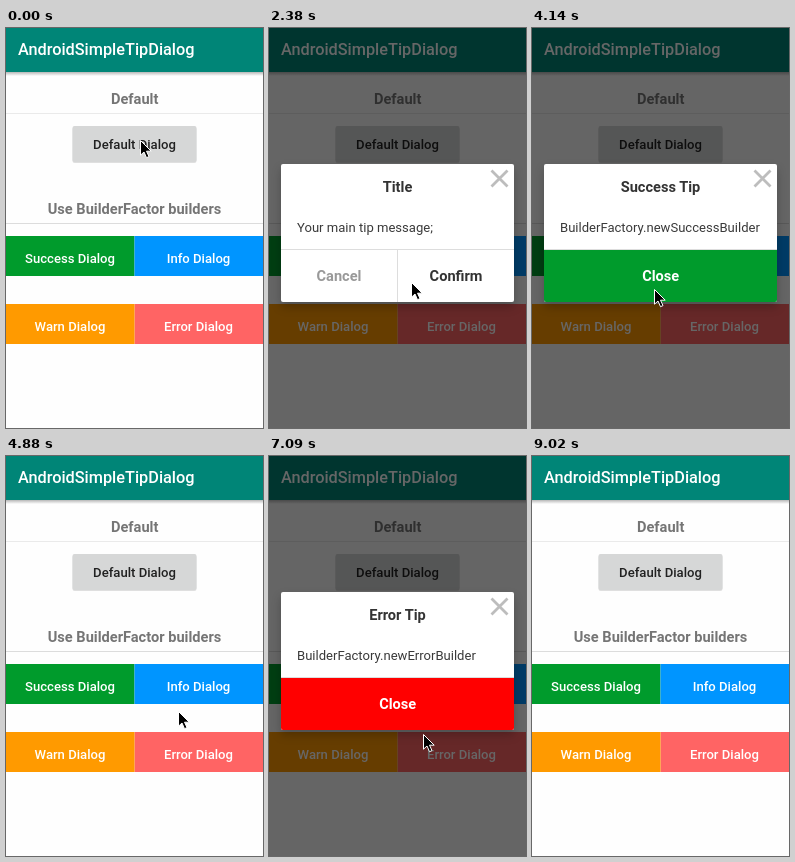
An HTML page for the animation above (9.82 s loop, 257 by 400 pixels).

```html
<!DOCTYPE html>
<html lang="en">
<head>
<meta charset="utf-8">
<title>AndroidSimpleTipDialog</title>
<style>
  html, body { margin: 0; width: 100%; height: 100%; overflow: hidden; background: #fefefe; }
  svg { display: block; width: 257px; height: 400px; font: 13.1px Roboto, sans-serif; text-anchor: middle; }
  .head { font-size: 14.6px; font-weight: 700; }
  .label { font-weight: 500; fill: #fff; }
  #panel { filter: drop-shadow(0 5px 5px rgba(0, 0, 0, .22)); }
</style>
</head>
<body>
<svg viewBox="0 0 257 400">
  <defs>
    <linearGradient id="shade" x2="0" y2="1">
      <stop stop-opacity=".28"/><stop offset="1" stop-opacity="0"/>
    </linearGradient>
  </defs>

  <rect width="257" height="400" fill="#fefefe"/>
  <rect y="44" width="257" height="4" fill="url(#shade)"/>
  <rect width="257" height="44" fill="#008577"/>
  <text x="12" y="27" class="label" style="font-size:16.3px;text-anchor:start">AndroidSimpleTipDialog</text>

  <g class="head" fill="#757575">
    <text x="128.7" y="76">Default</text>
    <text x="128.5" y="186">Use BuilderFactor builders</text>
  </g>
  <path d="M0 85.5H257" stroke="#eaeaea"/>
  <path d="M0 195.5H257" stroke="#dcdcdc"/>

  <rect x="66.5" y="99" width="124" height="36" rx="2" opacity=".12"/>
  <rect x="66.5" y="98" width="124" height="36" rx="2" fill="#d6d7d7"/>
  <text x="128.5" y="121" class="label" style="fill:#212121">Default Dialog</text>
  <g id="buttons"></g>

  <g id="overlay">
    <rect width="257" height="400" opacity=".6"/>
    <g id="panel">
      <rect x="12" y="136" width="233" height="138" rx="2" fill="#fff"/>
      <path d="M222.5 142.5l16 16m0-16l-16 16" stroke="#bdbdbd" stroke-width="2.8"/>
      <text id="title" class="head" x="128.5" y="164" fill="#333"/>
      <text id="message" x="28" y="203.5" fill="#3a3a3a" style="font-size:13.07px;text-anchor:start"/>
      <path d="M12 221.5H245" stroke="#ddd"/>
      <g id="choice" class="head">
        <path d="M128.5 222V274" stroke="#ddd"/>
        <text x="70" y="253" fill="#999">Cancel</text>
        <text x="187" y="253" fill="#333">Confirm</text>
      </g>
      <g id="close" class="head">
        <path id="bar" d="M12 222H245V272q0 2-2 2H14q-2 0-2-2z"/>
        <text x="128.7" y="253" fill="#fff">Close</text>
      </g>
    </g>
  </g>
  <path id="cursor" d="M.5 .5V15.2L4 12 6.500 17.700 9 16.600 6.500 11.200H11.200Z" stroke="#fff"/>
</svg>

<script>
const LOOP = 9820, TICK = 147.4;
const $ = id => document.getElementById(id);

// Button corner, ticks at which the dialog opens and closes, pointer place while it is open
const scenes = [
  { name: 'Default', x: 62, y: 88, open: 5, close: 18, rest: [142, 254] },
  { name: 'Success', x: 0, y: 208, open: 25, close: 32, rest: [149, 273], color: '#009b2c' },
  { name: 'Info', x: 128.5, y: 208, open: 36, close: 41, rest: [165, 241], color: '#0095ff' },
  { name: 'Error', x: 128.5, y: 276, open: 44, close: 49, rest: [154, 278], color: '#ff6464', bar: '#ff0000' },
  { name: 'Warn', x: 0, y: 276, open: 52, close: 57, rest: [149, 273], color: '#ff9a00' }
];

$('buttons').innerHTML = scenes.slice(1).map(({ name, x, y, color }) =>
  `<rect x="${x}" y="${y}" width="128.5" height="40" fill="${color}"/>
   <text class="label" x="${x + 64}" y="${y + 27}">${name} Dialog</text>`).join('');

// The pointer waits on each button, then beside or on the dialog, and finally leaves
const stop = (from, to, [x, y]) => [{ t: from, x, y }, { t: to, x, y }];
const path = [
  { t: 0, x: 134, y: 112 },
  ...scenes.flatMap(({ x, y, open, close, rest }) => [
    ...stop(open - 2, open + 1, [x + 67, y + 29]),
    ...stop(open + 4, close, rest)
  ]),
  { t: 60, x: 216, y: 377 }
];

function pointer(k) {
  const i = path.findIndex(p => p.t >= k);
  if (i < 0) return null;
  const b = path[i], a = path[i - 1] || b;
  const u = (k - a.t) / (b.t - a.t || 1);
  return [a.x + (b.x - a.x) * u, a.y + (b.y - a.y) * u].map(Math.round);
}

const show = (id, on) => { $(id).style.display = on ? '' : 'none'; };

function draw() {
  const k = Math.floor(performance.now() % LOOP / TICK);

  const scene = scenes.find(s => k >= s.open && k <= s.close);
  show('overlay', scene);
  if (scene) {
    const { name, open, close, color, bar = color } = scene;
    $('overlay').style.opacity = k === open || k === close ? .5 : 1;
    $('title').textContent = color ? name + ' Tip' : 'Title';
    $('message').textContent = color ? `BuilderFactory.new${name}Builder` : 'Your main tip message;';
    show('choice', !color);
    show('close', color);
    if (bar) $('bar').setAttribute('fill', bar);
  }

  const at = pointer(k);
  show('cursor', at);
  if (at) $('cursor').setAttribute('transform', `translate(${at})`);
  requestAnimationFrame(draw);
}
draw();
</script>
</body>
</html>
```
